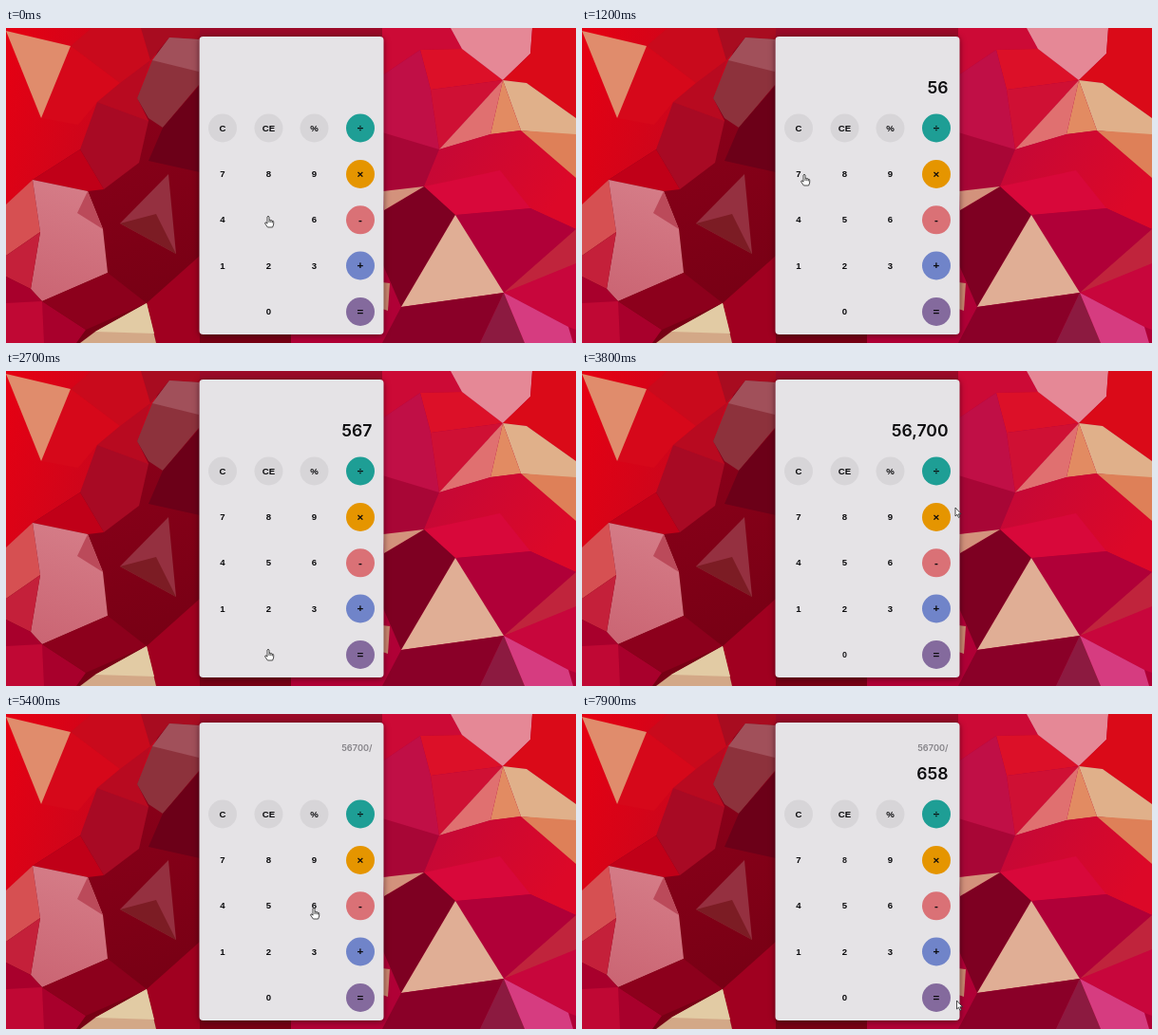
Recreate the animation shown at these times as an HTML page. Size 600 by 332 pixels, loop 8 s.

```html
<!DOCTYPE html>
<html lang="en">
<head>
<meta charset="utf-8">
<title>Calculator</title>
<style>
  html, body { margin: 0; width: 100%; height: 100%; overflow: hidden; background: #a50028; }
  svg { display: block; width: 600px; height: 332px; }
  .panel { fill: #e5e3e6; filter: drop-shadow(0 1px 3px rgba(30, 0, 10, .6)); }
  .key { font: bold 9.6px "Liberation Sans", Arial, sans-serif; text-anchor: middle; fill: #0b0b0d; }
  .out { font: 600 17.6px Inter, sans-serif; text-anchor: end; fill: #0c0c0e; }
  .past { font: 600 9.2px Inter, sans-serif; text-anchor: end; fill: #858388; }
</style>
</head>
<body>
<svg viewBox="0 0 600 332">
  <defs>
    <linearGradient id="red" x2="1" y2=".3"><stop stop-color="#e60012"/><stop offset="1" stop-color="#c00820"/></linearGradient>
    <linearGradient id="rose" x1=".6" x2=".4" y2="1"><stop stop-color="#d57d88"/><stop offset="1" stop-color="#cb6674"/></linearGradient>
    <linearGradient id="wine" x2=".3" y2="1"><stop stop-color="#94001c"/><stop offset="1" stop-color="#760014"/></linearGradient>
    <linearGradient id="scarlet" x2="1" y2=".4"><stop stop-color="#c20838"/><stop offset="1" stop-color="#dc0828"/></linearGradient>
  </defs>

  <g>
    <path fill="url(#wine)" d="M0 0H300V332H0z"/>
    <path fill="url(#red)" d="M0 0H170L138 74 150 98 78 128 28 160 0 190z"/>
    <path fill="#c90a1c" d="M68 19L90 0 142 0 152 34 120 58z"/>
    <path fill="#a80c20" d="M142 0H204V12L172 10 152 34z"/>
    <path fill="#d6081a" d="M68 19L120 58 96 78 76 102 37 95z"/>
    <path fill="#b80a20" d="M120 58L152 34 138 74 150 98 96 78z"/>
    <path fill="#e08c6c" d="M0 3L68 19 37 95z"/>
    <path fill="#8d323c" d="M138 74L154 34 172 10 203 12V60L165 105 150 95z"/>
    <path fill="#a1505a" d="M154 34L172 10 203 12V46z"/>
    <path fill="#6c0018" d="M165 105L204 60V152L150 140z"/>
    <path fill="#a80a24" d="M78 128L96 78 150 98 140 142 103 170z"/>
    <path fill="#c00018" d="M28 160L78 128 103 170 86 172z"/>
    <path fill="#d65052" d="M28 160L36 215 0 240V186z"/>
    <path fill="url(#rose)" d="M28 160L86 172 102 212 107 258 38 288 26 275 36 215z"/>
    <path fill="#bb4a5a" d="M102 212L86 172 75 195z"/>
    <path fill="#c4203a" d="M0 240L36 215 26 275 0 262z"/>
    <path fill="#953040" d="M171 154L179 238 120 206z"/>
    <path fill="#7c1c24" d="M179 238L120 206 158 196z"/>
    <path fill="#a8002c" d="M0 262L26 275 38 288 84 318 74 332H0z"/>
    <path fill="#c00834" d="M0 290L38 288 40 332H0z"/>
    <path fill="#8c001c" d="M38 288L107 258 148 290 84 318z"/>
    <path fill="#a00020" d="M148 290L204 240V332H158z"/>
    <path fill="#d3a887" d="M78 332L94 320 148 290 158 332z"/>
    <path fill="#e2cba4" d="M94 320L148 290 156 322z"/>
  </g>

  <g>
    <path fill="#b00036" d="M300 0H600V332H300z"/>
    <path fill="#9a0a28" d="M204 0H396V20H204z"/>
    <path fill="#cc0a36" d="M396 0H468L480 22 436 23 396 50z"/>
    <path fill="#dc1028" d="M436 23L480 22 523 55 447 65z"/>
    <path fill="#c00f46" d="M396 50L436 23 447 65 456 128 396 160z"/>
    <path fill="#cf1034" d="M447 65L523 55 456 128z"/>
    <path fill="#a80636" d="M396 110L456 128 440 167 396 172z"/>
    <path fill="#e58896" d="M468 0H554L552 27 523 55 480 22z"/>
    <path fill="#da0a18" d="M554 0H600V95L548 58 523 55 552 27z"/>
    <path fill="#e0b08a" d="M523 55L548 58 600 95V114L542 108z"/>
    <path fill="#e28b62" d="M523 55L542 108 510 112z"/>
    <path fill="#e07070" d="M456 128L523 55 510 112z"/>
    <path fill="url(#scarlet)" d="M456 128L510 112 542 108 600 155V212L552 190 473 197 440 167z"/>
    <path fill="#de8058" d="M542 108L600 112V158z"/>
    <path fill="#d8083a" d="M440 167L520 150 552 190 473 197z"/>
    <path fill="#7e0022" d="M398 192L440 167 473 197 416 294 397 250z"/>
    <path fill="#d3927c" d="M397 172L440 167 398 192z"/>
    <path fill="#b00038" d="M473 197L552 190 600 212 524 279z"/>
    <path fill="#c0243c" d="M524 279L600 212V254z"/>
    <path fill="#c8063c" d="M524 279L600 248V318L592 315z"/>
    <path fill="#e0ae95" d="M473 197L524 279 416 294z"/>
    <path fill="#8a0028" d="M416 294L524 279 499 332H396z"/>
    <path fill="#8c1a40" d="M524 279L546 332H499z"/>
    <path fill="#d63c80" d="M524 279L592 315 597 332H546z"/>
    <path fill="#c9866f" d="M396 268L404 269 402 298 396 296z"/>
  </g>

  <rect class="panel" x="203.5" y="9" width="194" height="314" rx="4"/>
  <text class="past" id="past" x="385.5" y="39"></text>
  <text class="out" id="out" x="385.5" y="68.6"></text>
  <g id="keys"></g>

  <g id="hand" fill="#fff" stroke="#222" stroke-width=".8" stroke-linejoin="round">
    <path d="M-1 7V1Q0-.6 1 1V4.4Q2.2 3.6 2.8 4.8 4 4.2 4.4 5.4 5.6 5 5.7 6.4V9L4.6 12H-.6L-3.4 8Q-3.2 6.4-2 7L-1 8.2z"/>
    <path d="M1 4.4V7M2.9 5V7.2M4.4 5.5V7.4"/>
  </g>
  <path id="arrow" fill="#fff" stroke="#222" stroke-width=".8" d="M0 0V9L2 7.2 3.4 10.4 4.8 9.8 3.4 6.7H6z"/>
</svg>

<script>
const NS = 'http://www.w3.org/2000/svg';
const LOOP = 8000, STEP = 100, RECOVER = 700, KEY_SIZE = 9.6;
const $ = id => document.getElementById(id);
const cols = [228, 276.5, 324.5, 373], rows = [105.5, 154, 202.3, 250.5, 299];
const layout = [['C', 'CE', '%', '÷'], ['7', '8', '9', '×'], ['4', '5', '6', '-'], ['1', '2', '3', '+'], ['', '0', '', '=']];
const accents = { C: '#d7d5d8', CE: '#d7d5d8', '%': '#d7d5d8', '÷': '#1e9e95', '×': '#e59500', '-': '#da7176', '+': '#7084c9', '=': '#846a9d' };
const signSize = 11.6;

// [time, label]
const clicks = [[0, '5'], [300, '6'], [1400, '7'], [2400, '0'], [3200, '0'], [5500, '6'], [6650, '5'], [7300, '8']];
// [time, history, value]
const screens = [[0, '', ''], [200, '', '5'], [800, '', '56'], [1900, '', '567'], [2800, '', '5,670'], [3300, '', '56,700'],
  [4400, '56700/', ''], [5900, '56700/', '6'], [6900, '56700/', '65'], [7600, '56700/', '658']];
// [time, x, y] of the pointer tip
const path = [[0, 276, 198], [100, 276, 198], [300, 325, 199], [500, 325, 199], [700, 290, 178], [1000, 234, 154],
  [1800, 234, 154], [2400, 276, 293], [3400, 276, 293], [3800, 393, 144], [4200, 373, 102], [4500, 373, 102],
  [5300, 324, 204], [5800, 324, 204], [6200, 274, 199], [6700, 274, 199], [7100, 277, 150], [7500, 277, 150], [7900, 394.5, 302]];

const keys = {};
function add(tag, attrs) {
  const el = document.createElementNS(NS, tag);
  for (const name in attrs) el.setAttribute(name, attrs[name]);
  return $('keys').appendChild(el);
}
layout.forEach((row, r) => row.forEach((label, c) => {
  if (!label) return;
  if (accents[label]) add('circle', { cx: cols[c], cy: rows[r], r: 15, fill: accents[label] });
  const size = c === 3 ? signSize : KEY_SIZE;
  const text = add('text', { class: 'key', x: cols[c], y: rows[r] + size * .33 });
  text.textContent = label;
  text.style.fontSize = size + 'px';
  keys[label] = { text, y: rows[r] };
}));

const latest = (list, t) => list.filter(item => item[0] <= t).pop();

function pointer(t) {
  const i = path.findIndex(p => p[0] > t);
  if (i < 0) return path[path.length - 1].slice(1);
  const [t0, x0, y0] = path[i - 1], [t1, x1, y1] = path[i];
  const k = (t - t0) / (t1 - t0);
  return [x0 + (x1 - x0) * k, y0 + (y1 - y0) * k];
}

function drawDigit(label, t) {
  const hit = latest(clicks.filter(c => c[1] === label), t);
  const s = hit ? Math.sqrt(Math.min(1, (t - hit[0]) / RECOVER)) : 1;
  const { text, y } = keys[label];
  text.style.fontSize = KEY_SIZE * s + 'px';
  text.style.fontWeight = s < .9 ? 400 : 700;
  text.style.opacity = s;
  text.setAttribute('y', y + KEY_SIZE * s * .33);
}

function draw(t) {
  const [, past, out] = latest(screens, t);
  $('past').textContent = past;
  $('out').textContent = out;
  for (const label of '05678') drawDigit(label, t);
  const [x, y] = pointer(t), onKey = x < 390;
  $('hand').style.display = onKey ? '' : 'none';
  $('arrow').style.display = onKey ? 'none' : '';
  $(onKey ? 'hand' : 'arrow').setAttribute('transform', `translate(${x} ${y})`);
}

const start = performance.now();
function tick() {
  const t = (performance.now() - start) % LOOP;
  draw(Math.floor(t / STEP) * STEP);
  requestAnimationFrame(tick);
}
tick();
</script>
</body>
</html>
```
